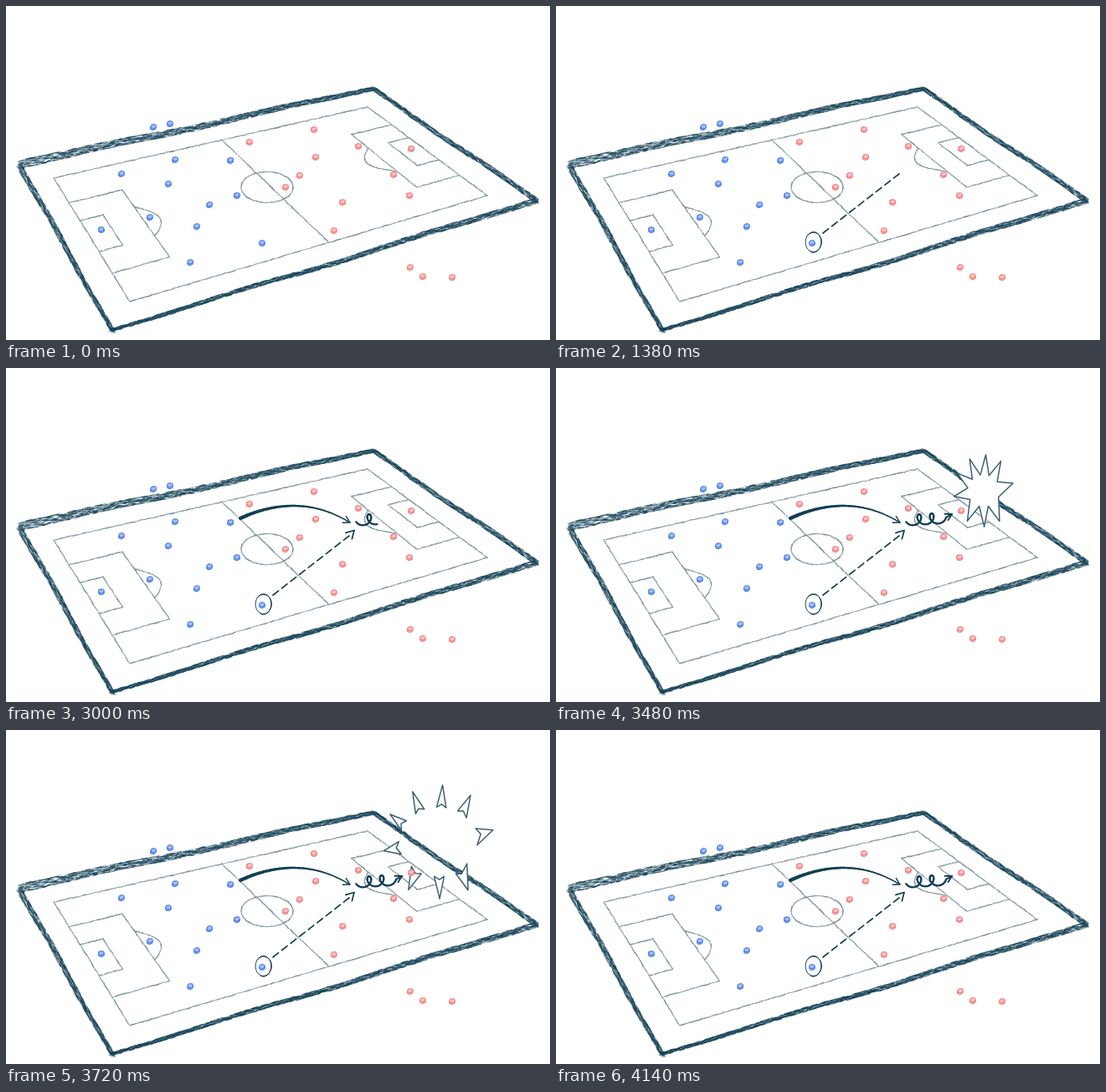
Recreate the animation shown at these times as an HTML page with a canvas. Size 650 by 400 pixels, loop 4530 ms.

```html
<!DOCTYPE html>
<html lang="en">
<head>
<meta charset="utf-8">
<title>Football tactics sketch</title>
<style>
  html, body { margin: 0; width: 100%; height: 100%; overflow: hidden; background: #fff; }
  canvas { display: block; width: 650px; height: 400px; }
</style>
</head>
<body>
<canvas id="stage" width="650" height="400"></canvas>
<script>
const LOOP = 4530, STEP = 30, TAU = 2 * Math.PI;
const INK = '#123f54', PENCIL = '#788f9b';
const ctx = document.getElementById('stage').getContext('2d');

let seed = 7;
const random = () => (seed = (seed * 16807) % 2147483647) / 2147483647;
const jitter = amount => (random() - 0.5) * amount;
const span = (t, start, end) => Math.min(1, Math.max(0, (t - start) / (end - start)));
const mix = (p, q, u) => [p[0] + (q[0] - p[0]) * u, p[1] + (q[1] - p[1]) * u];
const distance = (p, q) => Math.hypot(q[0] - p[0], q[1] - p[1]);
const polar = ([x, y], angle, rx, ry = rx) => [x + rx * Math.cos(angle), y + ry * Math.sin(angle)];
const sample = (count, curve) => Array.from({ length: count + 1 }, (_, i) => curve(i / count));

function segment(g, p, q) {
  g.beginPath();
  g.moveTo(...p);
  g.lineTo(...q);
  g.stroke();
}

function layer(paint) {
  const canvas = document.createElement('canvas');
  canvas.width = 650;
  canvas.height = 400;
  const g = canvas.getContext('2d');
  g.lineCap = 'round';
  paint(g);
  return canvas;
}

// Maps the unit square onto the slanted playing field.
const field = (u, v) => mix(mix([57, 206], [432, 121], u), mix([148, 354], [575, 227], u), v);

function pencilLine(g, points) {
  g.strokeStyle = PENCIL;
  points.slice(1).forEach((q, i) => {
    const p = points[i], pieces = Math.ceil(distance(p, q) / 4);
    let from = p;
    for (let k = 1; k <= pieces; k++) {
      const [x, y] = mix(p, q, k / pieces);
      const to = [x + jitter(0.8), y + jitter(0.8)];
      g.globalAlpha = 0.6 + random() * 0.4;
      g.lineWidth = 1 + random() * 0.6;
      segment(g, from, to);
      from = to;
    }
  });
  g.globalAlpha = 1;
}

// A crayon edge made of many short overlapping strands, tapering from one width to another.
function crayonBand(g, a, b, widthA, widthB) {
  const length = distance(a, b);
  const [dx, dy] = [(b[0] - a[0]) / length, (b[1] - a[1]) / length];
  const phase = random() * TAU;
  for (let s = 0; s < length; s += 1.2) {
    const width = widthA + (widthB - widthA) * s / length;
    const drift = 1.2 * Math.sin(s / 38 + phase) * Math.sin(Math.PI * s / length);
    for (let k = 0; k < 5; k++) {
      const off = drift + jitter(width), reach = 2 + random() * 4;
      const [x, y] = [a[0] + dx * s - dy * off, a[1] + dy * s + dx * off];
      g.strokeStyle = INK;
      g.globalAlpha = 0.3 + random() * 0.4;
      g.lineWidth = 0.7 + random() * 0.5;
      segment(g, [x, y], [Math.min(636, x + dx * reach), y + dy * reach]);
    }
  }
  g.globalAlpha = 1;
}

const pitch = layer(g => {
  pencilLine(g, [field(0, 0), field(1, 0), field(1, 1), field(0, 1), field(0, 0)]);
  pencilLine(g, [field(0.536, 0), field(0.557, 1)]);
  pencilLine(g, sample(40, s => polar([312, 217], TAU * s, 31, 18.5)));
  // Each end has a penalty area, a goal area and an arc, drawn inwards from its goal line.
  for (const [goal, area, box] of [[0, 0.165, 0.07], [1, 0.876, 0.937]]) {
    pencilLine(g, [field(goal, 0.2), field(area, 0.2), field(area, 0.77), field(goal, 0.77)]);
    pencilLine(g, [field(goal, 0.345), field(box, 0.345), field(box, 0.595), field(goal, 0.595)]);
    const bulge = goal ? -0.045 : 0.045;
    pencilLine(g, sample(14, s => field(area + bulge * Math.sin(Math.PI * s), 0.345 + 0.25 * s)));
  }
  const [west, north, east, south] = [[15, 190], [439, 99], [634, 233], [127, 388]];
  crayonBand(g, west, north, 10, 5);
  crayonBand(g, north, east, 5, 6);
  crayonBand(g, east, south, 7, 4);
  crayonBand(g, west, south, 7, 5);
});

function coin(g, [x, y], dark, pale) {
  g.strokeStyle = dark;
  g.fillStyle = pale;
  g.lineWidth = 1.1;
  for (const lift of [0.9, -0.7]) {
    g.beginPath();
    g.ellipse(x + jitter(0.5), y + lift, 3.4, 2.5, -0.2, 0, TAU);
    g.fill();
    g.stroke();
  }
}

const players = layer(g => {
  const blue = [[176,145],[196,141],[276,227],[172,253],[202,184],[138,201],[194,213],[268,185],
    [243,238],[228,264],[114,268],[306,284],[220,307]];
  const red = [[291,163],[368,148],[370,181],[351,203],[334,217],[421,168],[484,171],[463,202],
    [482,227],[402,235],[392,269],[483,313],[498,324],[533,325]];
  blue.forEach(p => coin(g, p, '#4a7ce6', '#a3bff8'));
  red.forEach(p => coin(g, p, '#f47c7c', '#fcc4c4'));
});

// Draws the first part of a polyline, measured by length.
function trace(points, progress, width) {
  let left = progress * points.slice(1).reduce((sum, p, i) => sum + distance(points[i], p), 0);
  ctx.strokeStyle = INK;
  ctx.lineCap = 'round';
  for (let i = 1; i < points.length && left > 0; i++) {
    const length = distance(points[i - 1], points[i]);
    ctx.lineWidth = typeof width === 'function' ? width(i / points.length) : width;
    segment(ctx, points[i - 1], mix(points[i - 1], points[i], Math.min(1, left / length)));
    left -= length;
  }
}

const arrowHead = (tip, heading, size) =>
  [polar(tip, heading + Math.PI + 0.52, size), tip, polar(tip, heading + Math.PI - 0.52, size)];

const ring = sample(60, s => polar([307.6, 282.7], TAU * 1.7 * s - 2.4, 10.2 - 1.4 * s, 11.2 + 1.4 * s));
const passStart = [319, 272], passEnd = [410, 201];
const passHead = arrowHead([416, 194.5], -0.8, 10.5);
const run = sample(50, s => mix(mix([280, 180], [350, 148], s), mix([350, 148], [410, 184.5], s), s));
const runHead = arrowHead([411, 185], 0.49, 8.7);
// Two loops of a rolling circle, then a flick to the tip.
const dribble = sample(80, s => {
  const turn = -0.2 + 2.47 * s;
  return polar([426.5 + 15 * turn, 182 - turn], Math.PI / 2 - TAU * turn, 5.6, 6.3);
}).concat([[473, 175]]);
const dribbleHead = arrowHead([473, 175], -0.49, 8.5);

const BURST = [511, 147];
const spikeAngles = [-118, -86, -55, -12, 58, 89, 123, 171, 209].map(a => a * TAU / 360);
const spikes = spikeAngles.map((angle, i) => {
  const before = spikeAngles[i - 1] ?? spikeAngles.at(-1) - TAU;
  const after = spikeAngles[i + 1] ?? spikeAngles[0] + TAU;
  return {
    tip: polar(BURST, angle, 39, 47),
    left: polar(BURST, (before + angle) / 2, 21),
    right: polar(BURST, (angle + after) / 2, 21),
    notch: polar(BURST, angle, 24)
  };
});

function paper(points) {
  ctx.beginPath();
  points.forEach(p => ctx.lineTo(...p));
  ctx.closePath();
  ctx.fillStyle = '#fff';
  ctx.fill();
  ctx.strokeStyle = '#3c6073';
  ctx.lineWidth = 1.5;
  ctx.lineJoin = 'round';
  ctx.stroke();
}

// The star pops up, then each spike flies off on its own and fades.
function drawBurst(t) {
  if (t <= 3360 || t >= 4170) return;
  if (t <= 3660) {
    const size = 1 - (1 - span(t, 3360, 3570)) ** 2;
    paper(spikes.flatMap(({ left, tip }) => [left, tip]).map(p => mix(BURST, p, size)));
    return;
  }
  const travel = 1.25 * (1 - (1 - span(t, 3630, 4140)) ** 6);
  ctx.globalAlpha = 1 - span(t, 3840, 4170);
  for (const { left, tip, right, notch } of spikes) {
    const dx = (0.7 * (tip[0] - BURST[0]) + 6) * travel;
    const dy = (0.45 * (tip[1] - BURST[1]) - 13) * travel;
    paper([left, tip, right, notch].map(([x, y]) => [x + dx, y + dy]));
  }
  ctx.globalAlpha = 1;
}

function drawPass(progress) {
  const dashes = 9, fill = 0.62, period = 1 / (dashes - 1 + fill);
  for (let i = 0; i < dashes; i++) {
    const from = i * period, to = Math.min(progress, from + period * fill);
    if (to > from) trace([mix(passStart, passEnd, from), mix(passStart, passEnd, to)], 1, 1.7);
  }
}

function draw(now) {
  const t = Math.floor((now % LOOP) / STEP) * STEP + STEP;
  ctx.fillStyle = '#fff';
  ctx.fillRect(0, 0, 650, 400);
  ctx.drawImage(pitch, 0, 0);
  drawBurst(t);
  ctx.drawImage(players, 0, 0);
  trace(ring, span(t, 330, 630), 0.8);
  drawPass(span(t, 840, 1410));
  trace(passHead, span(t, 1560, 1770), 1.7);
  trace(run, span(t, 2070, 2325), s => 1.4 + 2.8 * (1 - s) ** 1.5);
  trace(runHead, span(t, 2400, 2550), 1.4);
  trace(dribble, span(t, 2820, 3270), 2.1);
  trace(dribbleHead, span(t, 3270, 3360), 1.8);
}

const start = performance.now();
function tick() {
  draw(performance.now() - start);
  requestAnimationFrame(tick);
}
tick();
</script>
</body>
</html>
```
